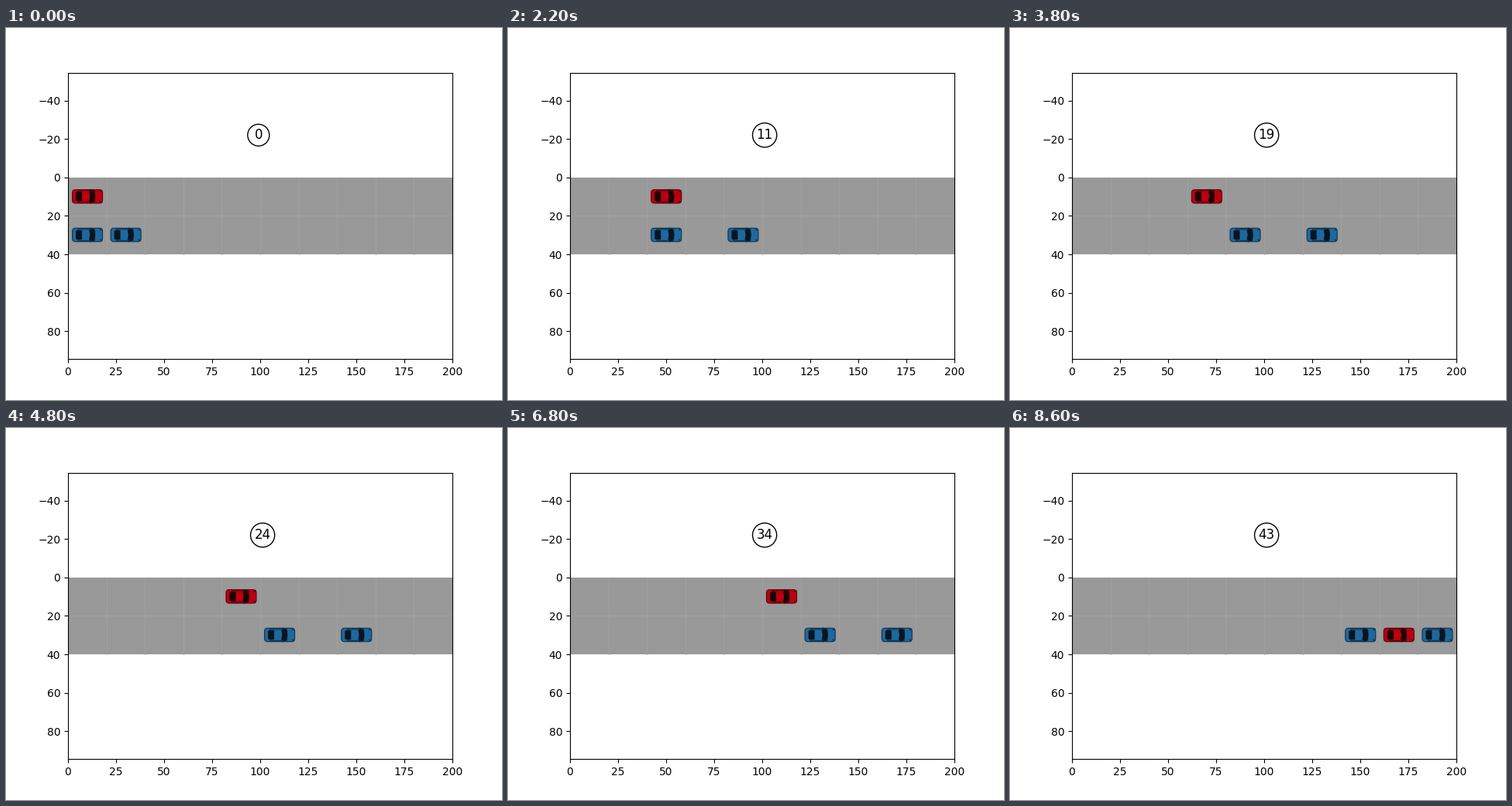
These frames come from a looping animation (640 px wide and 480 px high, 8.8 s). A matplotlib script:

```python
import matplotlib.pyplot as plt
from matplotlib.animation import FuncAnimation
from matplotlib.patches import Ellipse, FancyBboxPatch, Polygon, Rectangle
from matplotlib.transforms import Affine2D

FRAMES, INTERVAL = 44, 200
CELL, LANES = 20, 2
PX = 200 / 496  # data units per pixel

plt.rcParams["font.family"] = "DejaVu Sans"
fig, ax = plt.subplots(figsize=(6.4, 4.8), dpi=100)
half_height = 369.6 * PX / 2
ax.set(xlim=(0, 200), ylim=(20 + half_height, 20 - half_height))

ax.add_patch(Rectangle((0, 0), 200, LANES * CELL, fc="#999999", ec="none", zorder=0.5))
for x in range(CELL, 200, CELL):
    ax.plot([x, x], [0, LANES * CELL], color="#a2a2a2", lw=0.7, zorder=0.6)
ax.plot([0, 200], [CELL, CELL], color="#a2a2a2", lw=0.7, zorder=0.6)


class Car:
    """Top view of a car, built in pixels around its centre, facing right."""

    def __init__(self, paint, shade, glass, start, moves, swap=FRAMES):
        self.start, self.moves, self.swap = start, moves, swap
        self.parts = []
        self.box(-19.5, 19.5, 8.7, 4, paint, shade)
        self.box(-13, 10, 8.2, 1.5, shade)
        self.box(-15, -6, 5.8, 1.5, glass)
        self.box(-7, 3, 6.2, 1, paint)
        self.shape([(2, -6), (7, -8), (9.5, -5), (10.3, 0),
                    (9.5, 5), (7, 8), (2, 6), (3.5, 0)], glass)
        for side in (-1, 1):
            self.shape([(3, 8 * side), (4, 9.6 * side), (5.5, 8 * side)], glass)
            self.shape([(-14, 7 * side), (-7, 6.2 * side), (3, 6.4 * side),
                        (3, 7.1 * side), (-7, 7.1 * side)], paint)
            self.add(Ellipse((17.5, 6.9 * side), 4, 1.6, angle=35 * side,
                             fc=shade, ec="none"))

    def add(self, patch):
        patch.set_zorder(1.5)
        self.parts.append(ax.add_patch(patch))

    def box(self, left, right, half, radius, fill, edge="none"):
        self.add(FancyBboxPatch((left, -half), right - left, 2 * half,
                                boxstyle=f"round,pad=0,rounding_size={radius}",
                                fc=fill, ec=edge, lw=0.8))

    def shape(self, points, fill):
        self.add(Polygon(points, fc=fill, ec="none"))

    def place(self, frame):
        cell = self.start + sum(frame >= move for move in self.moves)
        lane = self.swap <= frame if self.swap < FRAMES else self.lane
        pose = Affine2D().scale(PX).translate(CELL * (cell + 0.5) + 0.1,
                                              CELL * (lane + 0.5) - 0.1)
        for part in self.parts:
            part.set_transform(pose + ax.transData)

    lane = 1


BLUE = ("#1f689c", "#0d3350", "#081521")
RED = ("#ba0010", "#5a0008", "#1c0204")
cars = [
    Car(*BLUE, 0, (4, 8, 12, 16, 20, 32, 36)),
    Car(*BLUE, 1, (2, 4, 8, 12, 16, 20, 32, 36)),
    Car(*RED, 0, (8, 10, 16, 20, 32, 36, 40, 43), swap=43),
]
counter = ax.text(97, -20, "0", size=12,
                  bbox=dict(boxstyle="circle", fc="white", ec="black", lw=1))


def update(frame):
    counter.set_text(str(frame))
    for car in cars:
        car.place(frame)
    return [counter]


anim = FuncAnimation(fig, update, frames=FRAMES, interval=INTERVAL,
                     repeat=True, repeat_delay=0)
plt.show()
```
